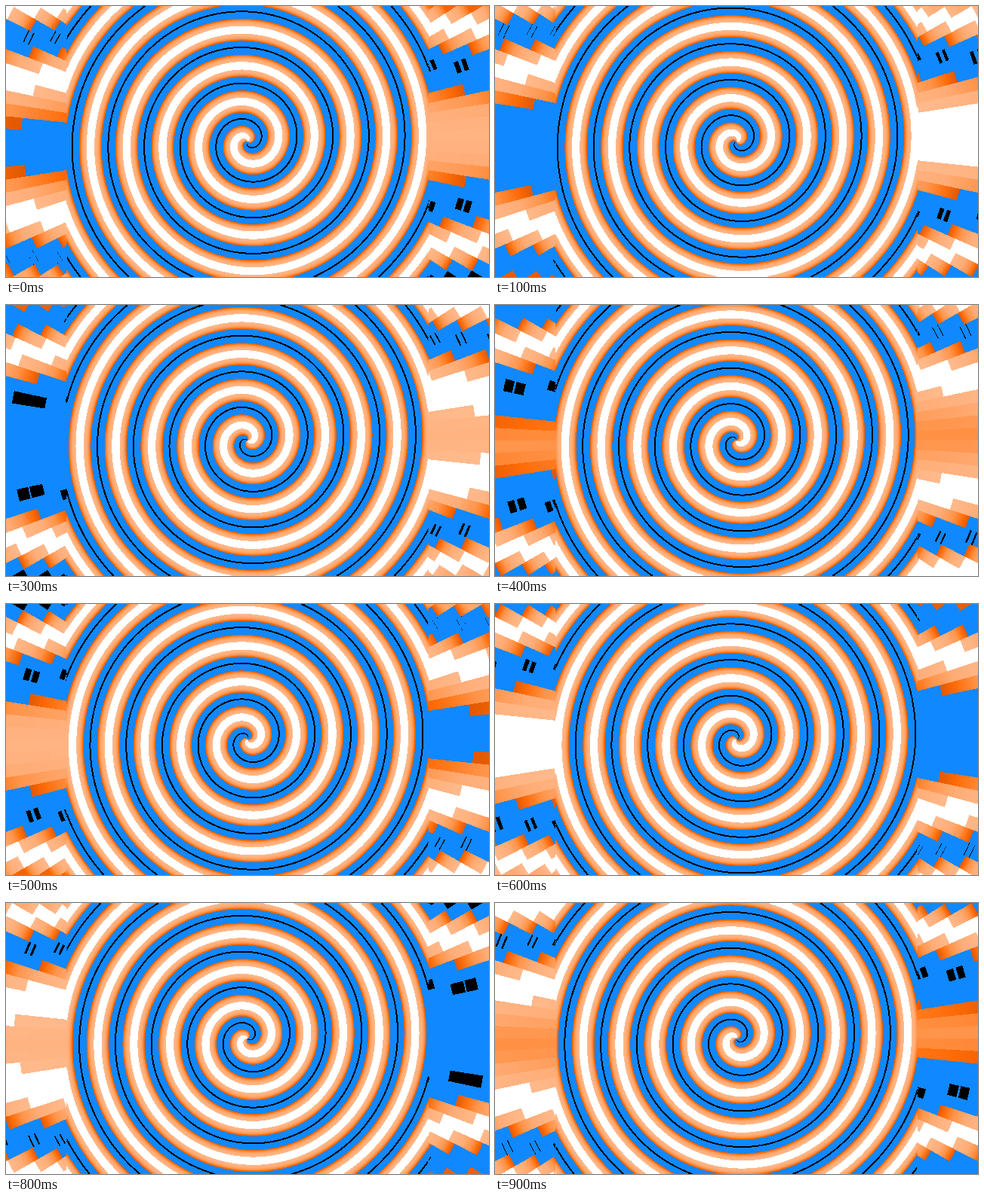
These frames come from a looping animation (640x360 px, 1000 ms). An HTML page with a canvas:

```html
<!DOCTYPE html>
<html lang="en">
<head>
<meta charset="utf-8">
<title>Spiral</title>
<style>
html, body { margin: 0; width: 100%; height: 100%; overflow: hidden; background: #1088ff; }
canvas { display: block; width: 640px; height: 360px; }
</style>
</head>
<body>
<canvas id="stage" width="640" height="360"></canvas>
<script>
const W = 640, H = 360;
const PITCH = 47.8;          // distance between spiral turns
const START = 16.7;          // radius of the blue band on the right at time 0
const WEDGE = Math.PI / 60;  // outside the square, angles are rounded to 3 degrees
const SIDE = 240;            // half width of the smooth middle
const MAX_X = 239, MAX_Y = 179;
const STEPS = 10, STEP_MS = 100;
const LINE = 1, LINE_AT = 0.5;
const BLUE_END = 9.1, WHITE_START = 18.75;
const BLUE = [16, 136, 255];
const ORANGE = [
  [9.1, 225, 88, 0],
  [10.2, 255, 108, 8],
  [12, 255, 148, 74],
  [14.5, 255, 172, 118],
  [18.75, 255, 186, 140]
];

const ctx = document.getElementById("stage").getContext("2d");
const image = ctx.createImageData(W, H);
const pixels = new Uint32Array(image.data.buffer);
const radius = new Float32Array(W * H);
const gap = new Float32Array(W * H);

const clamp = (v, m) => Math.max(-m, Math.min(m, v));
const pack = ([r, g, b]) => (255 << 24 | b << 16 | g << 8 | r) >>> 0;

// Colour by distance from the middle of the blue band
function shade(d) {
  if (d < BLUE_END) return BLUE;
  if (d >= WHITE_START) return [255, 255, 255];
  const i = ORANGE.findIndex(s => d < s[0]);
  const a = ORANGE[i - 1] || ORANGE[0], b = ORANGE[i] || ORANGE[0];
  const k = (d - a[0]) / (b[0] - a[0]);
  return [1, 2, 3].map(c => Math.round(a[c] + (b[c] - a[c]) * k));
}

const RES = 50;
const ramp = Uint32Array.from({ length: PITCH / 2 * RES + 2 }, (_, i) => pack(shade(i / RES)));
const black = pack([0, 0, 0]);

// Unwind the spiral once: what is left is a radius to compare with the band
for (let y = 0, i = 0; y < H; y++) {
  for (let x = 0; x < W; x++, i++) {
    const dx = x + 0.5 - W / 2, dy = y + 0.5 - H / 2;
    const r = Math.hypot(dx, dy);
    let a = Math.atan2(dy, dx);
    if (Math.abs(dx) > SIDE) a = (Math.floor(a / WEDGE) + 0.5) * WEDGE;
    const px = r * Math.cos(a);
    const qx = clamp(px, MAX_X), qy = clamp(r * Math.sin(a), MAX_Y);
    const turns = -Math.atan2(qy, qx) / (2 * Math.PI);
    radius[i] = Math.hypot(qx, qy) - turns * PITCH - START;
    // the stretched line splits in two and fades away from the middle height
    const h = Math.abs(qy);
    if (px !== qx && h > 69 && h < MAX_Y) gap[i] = (h / 157) ** 3;
  }
}

function draw(step) {
  const shift = step / STEPS * PITCH;
  for (let i = 0; i < pixels.length; i++) {
    const v = radius[i] - shift;
    const d = v - Math.round(v / PITCH) * PITCH;
    const e = Math.abs(d - LINE_AT);
    pixels[i] = e < LINE && e >= gap[i] ? black : ramp[Math.floor(Math.abs(d) * RES)];
  }
  ctx.putImageData(image, 0, 0);
}

const begin = performance.now();
let shown = -1;
function tick() {
  const ms = Math.max(0, performance.now() - begin);
  const step = Math.floor(ms / STEP_MS) % STEPS;
  if (step !== shown) draw(shown = step);
  requestAnimationFrame(tick);
}
tick();
</script>
</body>
</html>
```
